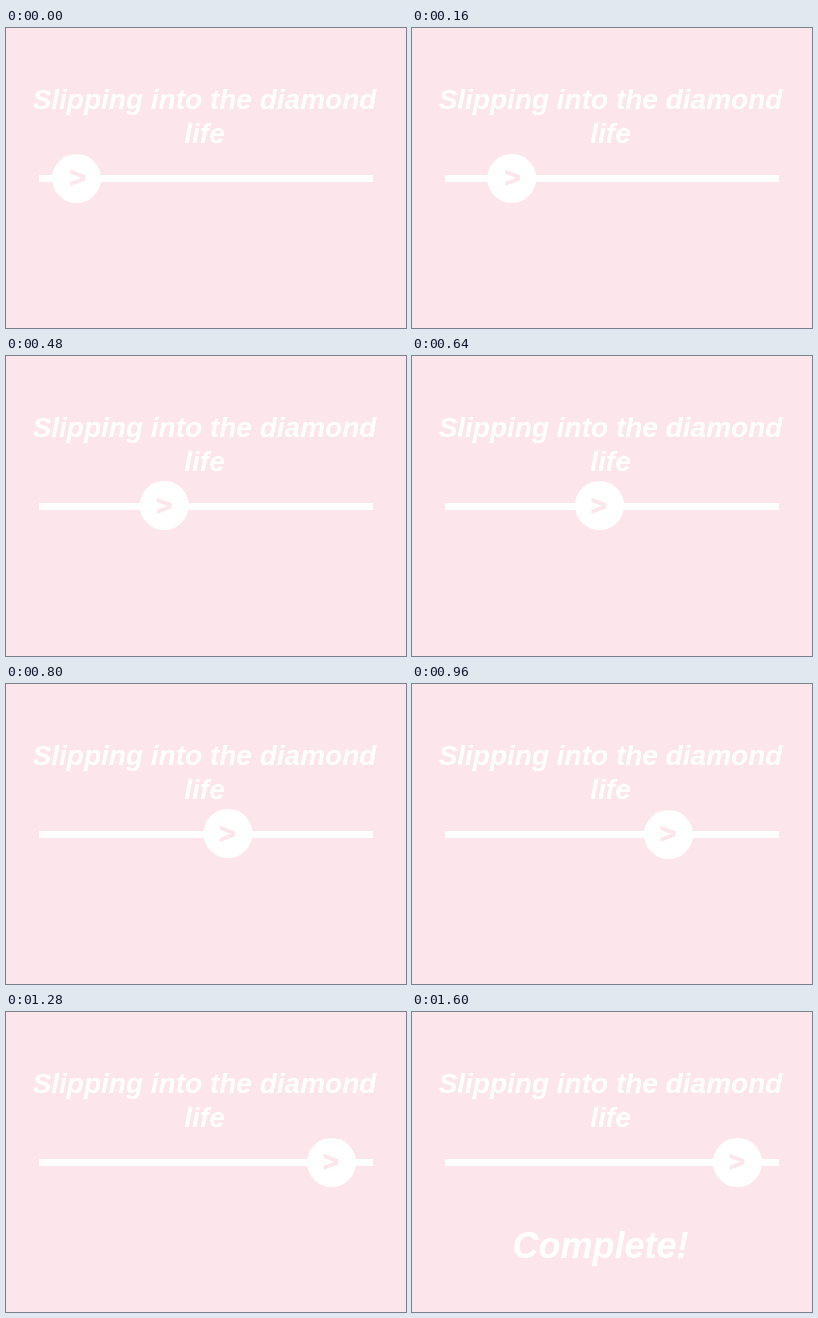
These frames come from a looping animation (400 by 300 pixels, 2.4 s). An HTML page:

```html
<!DOCTYPE html>
<html lang="en">
<head>
<meta charset="utf-8">
<title>Slider</title>
<style>
html, body { margin: 0; width: 100%; height: 100%; overflow: hidden; background: #fce6eb; }
svg { display: block; width: 400px; height: 300px; }
text { font: italic bold 28px "Liberation Sans", Arial, sans-serif; text-anchor: middle; fill: #fff; }
#arrow { font-style: normal; fill: #fce6eb; stroke: #fce6eb; stroke-width: 0.8px; }
#done { font-size: 36px; }
</style>
</head>
<body>
<svg viewBox="0 0 400 300">
  <text x="198.5" y="81">Slipping into the diamond</text>
  <text x="198.5" y="114.5">life</text>
  <rect x="33" y="147" width="334" height="7" fill="#fff"/>
  <circle id="knob" r="24.5" fill="#fff"/>
  <text id="arrow" y="159">&gt;</text>
  <text id="done" x="188.5" y="245.5">Complete!</text>
</svg>
<script>
const STEP = 160, LOOP = 2400, LAST = 8, HALF = LAST / 2;
const [knob, arrow, done] = ["knob", "arrow", "done"].map(id => document.getElementById(id));
const start = performance.now();

// Even steps from a to b, then faster even steps from b to c
const slide = (i, a, b, c) => i < HALF
  ? a + (b - a) * i / HALF
  : b + (c - b) * (i - HALF) / HALF;

function draw() {
  const t = (performance.now() - start) % LOOP;
  const i = Math.min(Math.floor(t / STEP), LAST);
  knob.setAttribute("cx", slide(i, 70.5, 187.5, 325.5));
  knob.setAttribute("cy", i > 1 && i < 6 ? 149.5 : 150.5);
  arrow.setAttribute("x", slide(i, 72, 187, 325));
  done.style.visibility = t < 10 * STEP ? "hidden" : "visible";
  requestAnimationFrame(draw);
}
draw();
</script>
</body>
</html>
```
